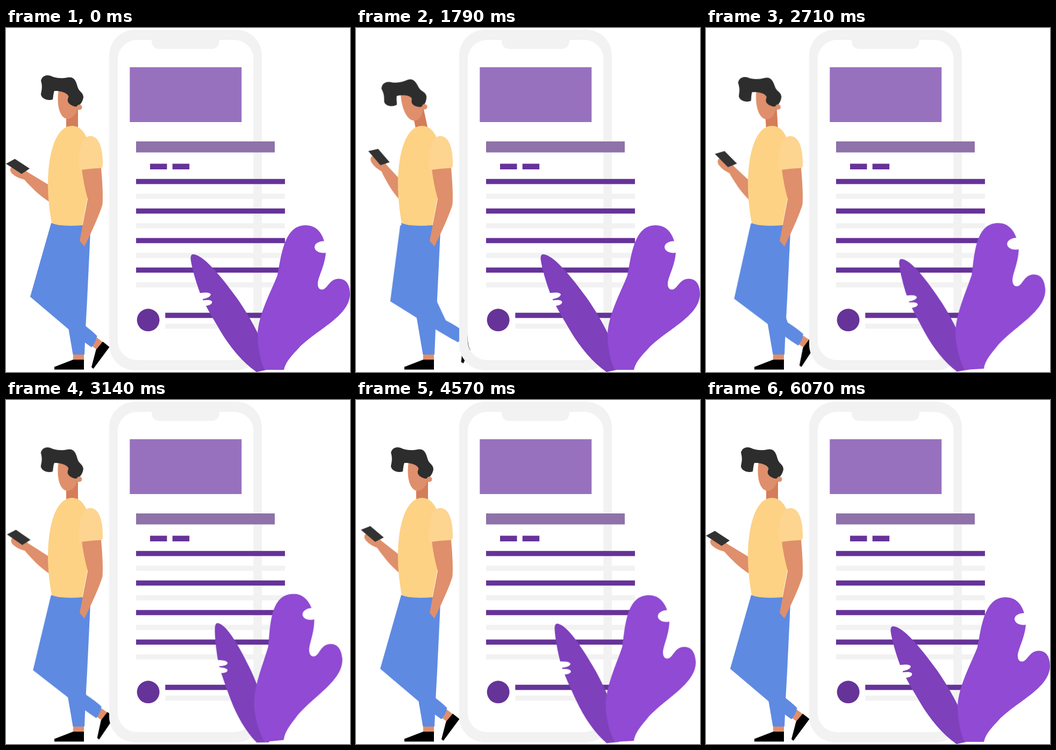
An HTML page that plays this animation: 640 by 640 pixels, repeating every 7.21 s.

```html
<!DOCTYPE html>
<html lang="en">
<head>
<meta charset="utf-8">
<title>Reading on the phone</title>
<style>
  html, body { margin: 0; width: 100%; height: 100%; overflow: hidden; background: #fff; }
  svg { display: block; width: 100%; height: 100%; }

  .move {
    transform-box: view-box;
    animation: 7210ms cubic-bezier(.37, 0, .63, 1) infinite;
  }
  .head  { transform-origin: 127.7px 189.5px; animation-name: nod; }
  .arm   { transform-origin: 95px 322px; animation-name: lift; }
  .leg   { transform-origin: 112px 377px; animation-name: swing; }
  .blade { transform-origin: 480px 637px; animation-name: sway; }
  .leaf  { transform-origin: 480px 637px; animation-name: lean; }

  @keyframes nod {
    0%, 1.4% { transform: rotate(0deg); }
    11.9% { transform: rotate(-12deg); }
    17.2% { transform: rotate(-16.5deg); }
    22.5%, 24.3% { transform: rotate(-12deg); }
    45.1%, 100% { transform: rotate(0deg); }
  }
  @keyframes lift {
    0% { transform: rotate(0deg); }
    11%, 33.3% { transform: rotate(16deg); }
    46.1%, 55.5% { transform: rotate(0deg); }
    62.4% { transform: rotate(7deg); }
    84.6%, 100% { transform: rotate(0deg); }
  }
  @keyframes swing {
    0% { transform: rotate(0deg); }
    11%, 22.7% { transform: rotate(-9deg); }
    31.8% { transform: rotate(-4.3deg); animation-timing-function: linear; }
    43.6% { transform: rotate(-2.4deg); animation-timing-function: linear; }
    55.5% { transform: rotate(-.4deg); animation-timing-function: ease-out; }
    58.3%, 100% { transform: rotate(0deg); }
  }
  @keyframes sway {
    0%, 26.4% { transform: rotate(0deg) scale(1); }
    31.8% { transform: rotate(-3.6deg) scale(.938); }
    45.1% { transform: rotate(10.8deg) scale(.94); }
    84.2%, 100% { transform: rotate(0deg) scale(1); }
  }
  @keyframes lean {
    0%, 27.7% { transform: rotate(0deg); }
    45.1% { transform: rotate(-5.6deg); }
    84.2%, 100% { transform: rotate(0deg); }
  }

  .skin { fill: #df8f6b; }
  .jeans { fill: #5e8ae2; }
  .grey { fill: #f2f2f2; }
  .violet { fill: #663399; }
</style>
</head>
<body>
<svg viewBox="0 0 640 640">
  <defs>
    <g id="row">
      <rect class="violet" width="277" height="9.6"/>
      <rect class="grey" y="27.5" width="277" height="9.6"/>
    </g>
  </defs>

  <!-- legs -->
  <g class="move leg">
    <path class="skin" d="M169 576L181 585L170 599L159 591Z"/>
    <path d="M180 583.5L192.500 593.500L162.500 634L159 631L167.500 598.500Z"/>
    <path class="jeans" d="M84 363L45 500L117 561L148 586L159 594Q167 585 169.500 573Q160 563 142 550L130 510L128 366Z"/>
  </g>
  <path class="skin" d="M125 606H145V618H125Z"/>
  <path d="M90 630.500L125 617H145V635.500H90Z"/>
  <path class="jeans" d="M84 363L157.500 368L151 505L148 560L146 607.500H124.500L113 540Z"/>

  <!-- head -->
  <g class="move head">
    <path d="M112 140H134V196H112Z" fill="#d47d5a"/>
    <path class="skin" d="M98 114C93 146 101 169 115 169C128 168 134 152 134 140L122 114Z"/>
    <path fill="#2d2d2d" d="M65 98C67 89 75 86 83 89C93 94 105 94 115 92C126 90 130 97 133 109C135 118 144 120 144 129C142 141 133 149 126 145.500C114 141 113 135 116.500 128C115 120 101 117 90 117C88 122 88 127 87 133C78 136 67 132 65 124C65 118 69 112 65 98Z"/>
    <circle class="skin" cx="136.500" cy="147.500" r="5"/>
  </g>

  <!-- hand with phone -->
  <g class="move arm">
    <path class="skin" d="M10 259C6 263 8 269 14 273C20 278 27 280 34 282C48 298 63 312 80 323L100 330L95 300L78 291L40 268L30 260Z"/>
    <path fill="#323232" d="M0 252.500L16.500 243.500L44 261.500L29 271.500Z"/>
  </g>

  <!-- body -->
  <path fill="#fdd285" d="M123 182C151 182 160 225 160 270L142 367Q100 370 85 363C80 335 78 312 78 290C78 235 92 182 123 182Z"/>
  <path class="skin" d="M141 262L177 260C179 285 181 310 179.500 328C175 345 159 380 146 406.500L137 396L152 318C147 300 143 280 141 262Z"/>
  <path fill="#fdd590" d="M136 264.500C134 230 140 201 157 201C175 201 181 230 180 256Q180 260 176 260.500Q155 261.500 136 264.500Z"/>

  <!-- device -->
  <rect x="208" y="22" width="253" height="596" rx="37" fill="#fff"/>
  <rect x="199.800" y="12.500" width="268.400" height="615" rx="42" fill="none" stroke="#f2f2f2" stroke-width="15.400"/>
  <path class="grey" fill-rule="evenodd" d="M240 3H428A48 48 0 0 1 476 51V589A48 48 0 0 1 428 637H240A48 48 0 0 1 192 589V51A48 48 0 0 1 240 3ZM244.500 22A37 37 0 0 0 207.500 59V581A37 37 0 0 0 244.500 618H424A37 37 0 0 0 461 581V59A37 37 0 0 0 424 22Z"/>
  <path class="grey" d="M271 21V23Q271 39 287 39H381Q397 39 397 23V21Z"/>
  <rect x="230.300" y="73" width="208" height="102" fill="#9871be"/>
  <rect x="242" y="211" width="258" height="20.500" fill="#8e72a9"/>
  <path class="violet" d="M268 252.500H299.500V263H268ZM309.700 252.500H341.200V263H309.700Z"/>
  <use href="#row" x="242" y="280.800"/>
  <use href="#row" x="242" y="335.700"/>
  <use href="#row" x="242" y="390.700"/>
  <use href="#row" x="242" y="445.600"/>
  <circle class="violet" cx="264.600" cy="543.300" r="21"/>
  <path class="violet" d="M296.300 529.700H500V539.500H296.300Z"/>
  <path class="grey" d="M296.300 550H490V559.500H296.300Z"/>

  <!-- plant -->
  <path class="move blade" fill="#7e40bb" d="M348 421C366 421 399 460 430 503C446 526 458 547 468 567L486 600L490 635L466 640C440 622 417 594 399 564C389 547 380 532 372 517C378 516 383 514 383.500 510C382 505 374 506 366 506.500V504.500C373 503 381 500 381 495.500C379 491 370 492 361 493C354 474 346 448 343.500 430Q343 421 348 421Z"/>
  <path class="move leaf" fill="#904ad3" d="M481 636C474 620 468 596 468 570C470 532 492 493 505 460C512 428 516 367 557 367C579 367 588 383 592 396.500C584 396 574 400 574 408C575 416 586 420 595 418C593 444 580 464 580 476C580 485 585 488 591 486C600 481 603 467 619 466.500C635 467 640 480 640 496C638 537 578 561 545 595C533 608 520 621 517 636Z"/>
</svg>
</body>
</html>
```
